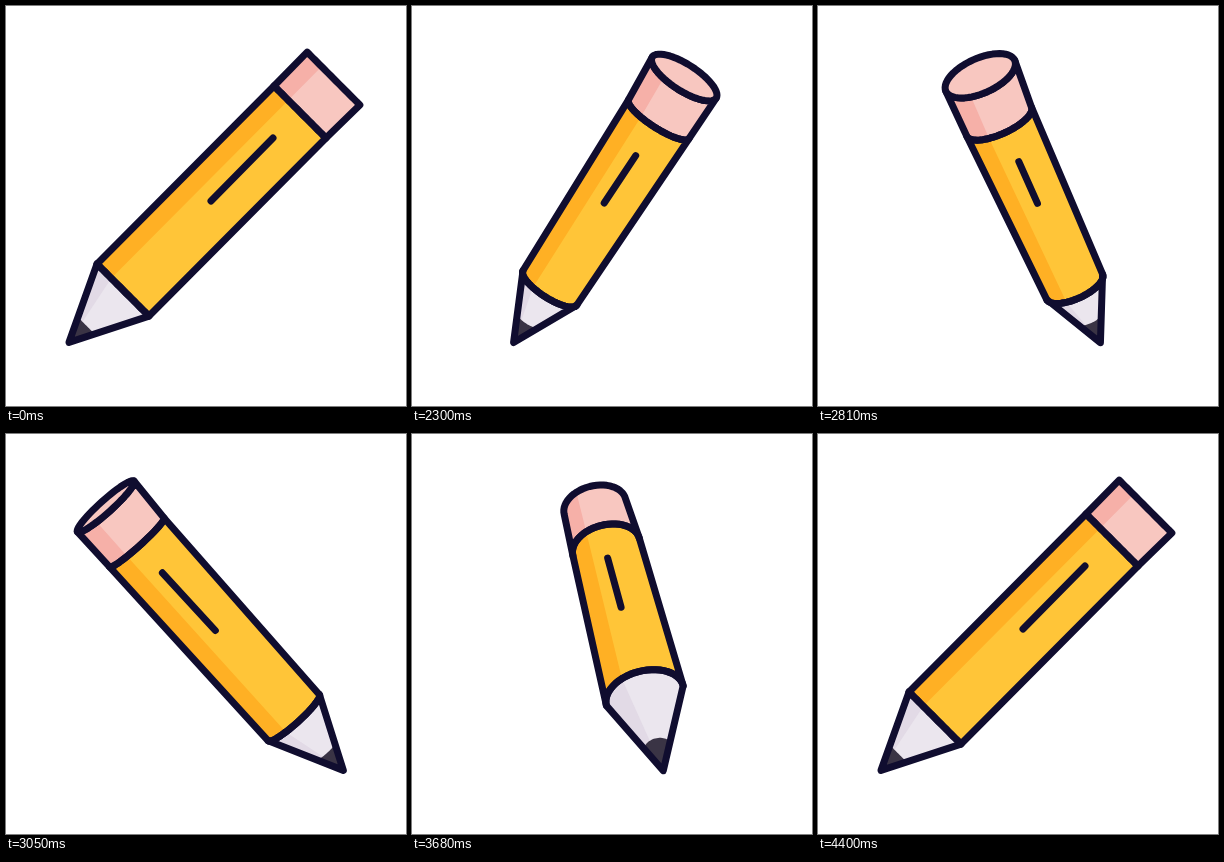
Animation, 400 px wide and 400 px high, one loop 4430 ms. Source, as an HTML page with a canvas:

```html
<!DOCTYPE html>
<html lang="en">
<head>
<meta charset="utf-8">
<title>Turning pencil</title>
<style>
  html, body { margin: 0; width: 100%; height: 100%; overflow: hidden; background: #fff; }
  canvas { display: block; width: 400px; height: 400px; }
</style>
</head>
<body>
<canvas id="stage" width="400" height="400"></canvas>
<script>
const ctx = document.getElementById('stage').getContext('2d');
const LOOP = 4430, HOLD = 2030, TURN_START = 2000, TURN = 2400, STEP = 30;
const INK = '#100d2f';
const SHADE = Math.acos(0.45);   // where the shaded strip ends on a ring

// Pose of the pencil turned by angle a about the vertical axis
function pose(a) {
  const c = Math.cos(a), s = Math.sin(a), q = s * s;
  const tip = { x: 205 - 142 * c * (1 + 0.06 * q), y: 336.3 + 0.5 * q };
  const top = {
    x: 205.25 + 122.25 * c * (1 - 0.45 * q),
    y: 72.5 - q * q * (3.2 * s + 3.3 * q),
    r: 37.3 + 3.1 * s - 3 * q,
    b: s * (15 + 7.5 * q)
  };
  const band = {
    x: 205 + 89 * c * (1 - 0.67 * q),
    y: 106 + 2.5 * s + 10.5 * q,
    r: 36.8 + 0.4 * s - 2.3 * q,
    b: s * (11 - 4 * s + 9.5 * q)
  };
  const base = {
    x: 205 - 88 * c * (1 + 0.1 * q + 0.08 * s * q),
    y: 284 + 4 * s - 14.5 * q + 6.3 * s * q,
    r: 36.8 - 5.2 * s - 2.3 * q,
    b: s * (17 - 6.3 * s + 3.5 * q)
  };
  const share = 0.32 + 0.07 * s + 0.08 * q;
  const mix = k => tip[k] + (base[k] - tip[k]) * share;
  const lead = { x: mix('x'), y: mix('y'), r: base.r * share, b: base.b * share };
  const mark = [
    { x: 205 + 62 * c * (1 - (0.9 + 0.35 * s) * q),
      y: 132 + 9 * s + 20 * q + 10.8 * s * q - 10 * q * q },
    { x: 205 - c * q * (27 + 13 * s), y: 195 + 7 * s - 10.5 * q + 6.5 * s * q }
  ];
  const dx = top.x - tip.x, dy = top.y - tip.y, len = Math.hypot(dx, dy);
  return { tip, top, band, base, lead, mark, axis: { x: dx / len, y: dy / len }, capSeen: s > 0.001 };
}

function draw(a) {
  const { tip, top, band, base, lead, mark, axis, capSeen } = pose(a);

  // Points on a ring: 0 is its left end, PI its right end
  function arc(ring, from, to, n = 28) {
    return Array.from({ length: n + 1 }, (_, i) => {
      const f = from + (to - from) * i / n;
      const u = ring.r * Math.cos(f), v = ring.b * Math.sin(f);
      return { x: ring.x + axis.y * u - axis.x * v, y: ring.y - axis.x * u - axis.y * v };
    });
  }
  function trace(points, close = true) {
    ctx.beginPath();
    points.forEach(p => ctx.lineTo(p.x, p.y));
    if (close) ctx.closePath();
  }
  function fill(points, color) {
    trace(points);
    ctx.fillStyle = color;
    ctx.fill();
  }
  function line(points, close) {
    trace(points, close);
    ctx.stroke();
  }
  const between = (r1, r2, end) => [...arc(r1, 0, end), ...arc(r2, end, 0)];
  const cone = (ring, end) => [...arc(ring, 0, end), tip];

  ctx.fillStyle = '#fff';
  ctx.fillRect(0, 0, 400, 400);
  ctx.strokeStyle = INK;
  ctx.lineWidth = 7;
  ctx.lineCap = ctx.lineJoin = 'round';

  const eraser = between(top, band, Math.PI);
  const body = between(band, base, Math.PI);
  const point = cone(base, Math.PI);

  fill(point, '#ebe6ee');
  fill(cone(base, SHADE), '#e2dae6');
  fill(cone(lead, Math.PI), '#3a3445');
  fill(body, '#ffc538');
  fill(between(band, base, SHADE), '#ffb024');
  fill(eraser, '#f8c7c0');
  fill(between(top, band, SHADE), '#f6b0a8');

  [point, body, eraser].forEach(p => line(p));
  if (capSeen) {
    const cap = arc(top, 0, 2 * Math.PI, 56);
    fill(cap, '#f8c7c0');
    line(cap);
  }
  line(mark, false);
}

function frame(now) {
  const t = now % LOOP;
  const shown = HOLD + Math.floor((t - HOLD) / STEP) * STEP;
  draw(t < HOLD ? 0 : (shown - TURN_START) / TURN * 2 * Math.PI);
  requestAnimationFrame(frame);
}
draw(0);
const start = performance.now();
requestAnimationFrame(now => frame(Math.max(0, now - start)));
</script>
</body>
</html>
```
